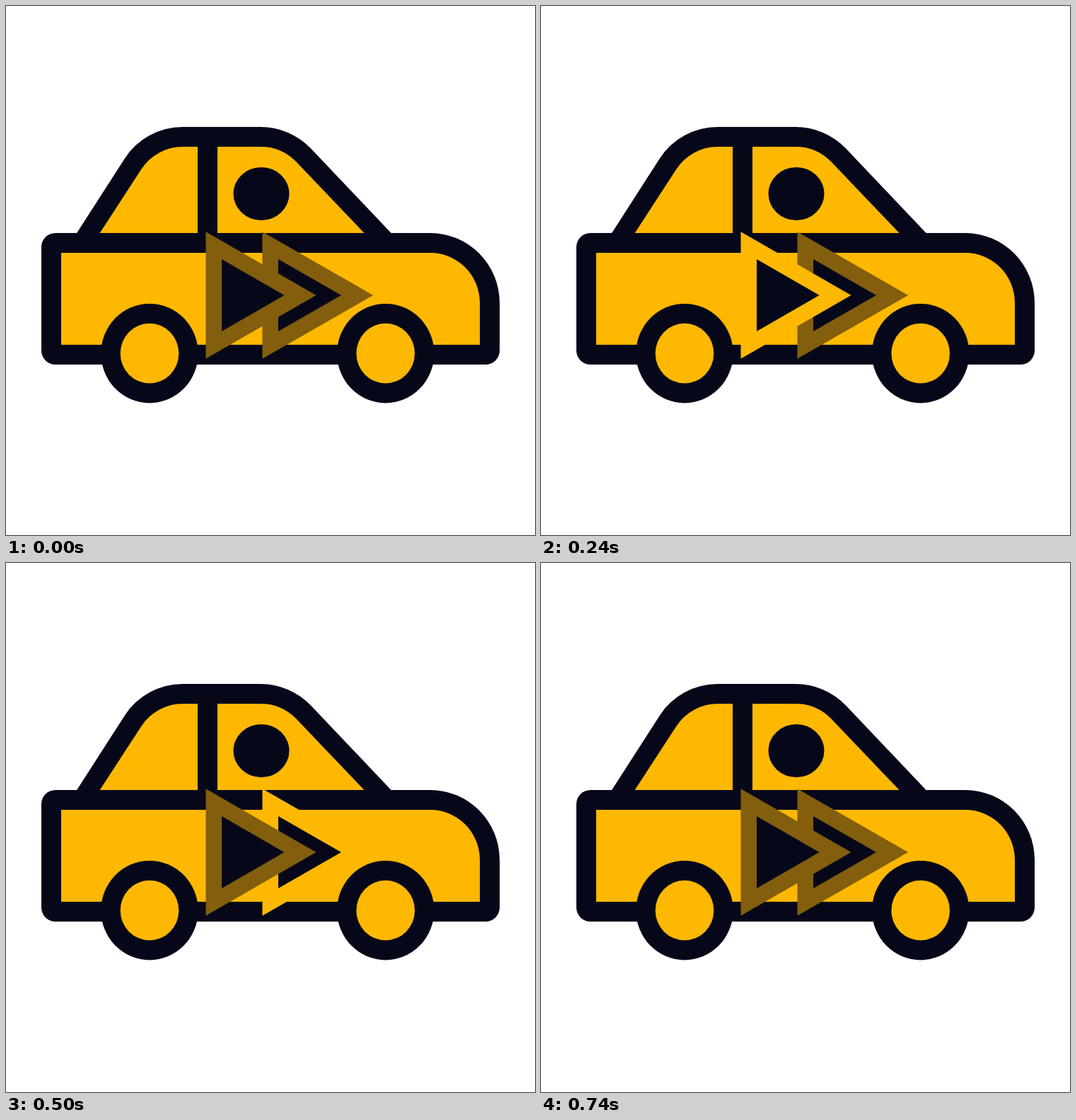
Recreate the animation shown at these times as an HTML page. Size 748x748 px, loop 0.84 s.

```html
<!DOCTYPE html>
<html lang="en">
<head>
<meta charset="utf-8">
<title>Car</title>
<style>
  html, body { margin: 0; width: 100%; height: 100%; overflow: hidden; background: #fff; }
  svg { display: block; width: 100%; height: 100%; }
  .ink { fill: #06081a; }
  .paint { fill: #ffb800; }
  .rim { fill: #825e0d; animation: .84s step-end infinite; }
  .rear .rim { animation-name: rear; }
  .front .rim { animation-name: front; }
  @keyframes rear {
    0%, 42.857%, 100% { fill: #825e0d; }
    28.571% { fill: #ffb800; }
  }
  @keyframes front {
    0%, 71.429%, 100% { fill: #825e0d; }
    42.857% { fill: #ffb800; }
  }
</style>
</head>
<body>
<svg viewBox="0 0 748 748">
  <defs>
    <g id="wheel">
      <ellipse class="ink" rx="68.7" ry="70.2"/>
      <ellipse class="paint" rx="41.3" ry="42.4"/>
    </g>
  </defs>

  <!-- cabin -->
  <path class="ink" d="M99.5 322L168 215.4A98 98 0 0 1 250 171H360A98 98 0 0 1 430.9 201.3L545.5 322Z"/>
  <path class="paint" d="M132.7 321L191.4 230.7A70 70 0 0 1 250 199H271V321Z"/>
  <path class="paint" d="M299 321V199H360A70 70 0 0 1 410.6 220.6L506.5 321Z"/>
  <ellipse class="ink" cx="361" cy="265.5" rx="39.5" ry="37.5"/>

  <!-- body -->
  <path class="ink" d="M70 321H600A98 99 0 0 1 698 420V487A20 20 0 0 1 678 507H70A20 20 0 0 1 50 487V341A20 20 0 0 1 70 321Z"/>
  <path class="paint" d="M78 349H600A70 71 0 0 1 670 420V479H78Z"/>
  <use href="#wheel" x="203" y="491.2"/>
  <use href="#wheel" x="536.7" y="491.2"/>

  <!-- arrows -->
  <g class="front" transform="translate(80)">
    <path class="rim" d="M282.5 319.3L439 409L282.5 498.7Z"/>
    <path class="ink" d="M305 358L394 409L305 460Z"/>
  </g>
  <g class="rear">
    <path class="rim" d="M282.5 319.3L438.5 409L282.5 498.7Z"/>
    <path class="ink" d="M305 358L393.5 409L305 460Z"/>
  </g>
</svg>
</body>
</html>
```
